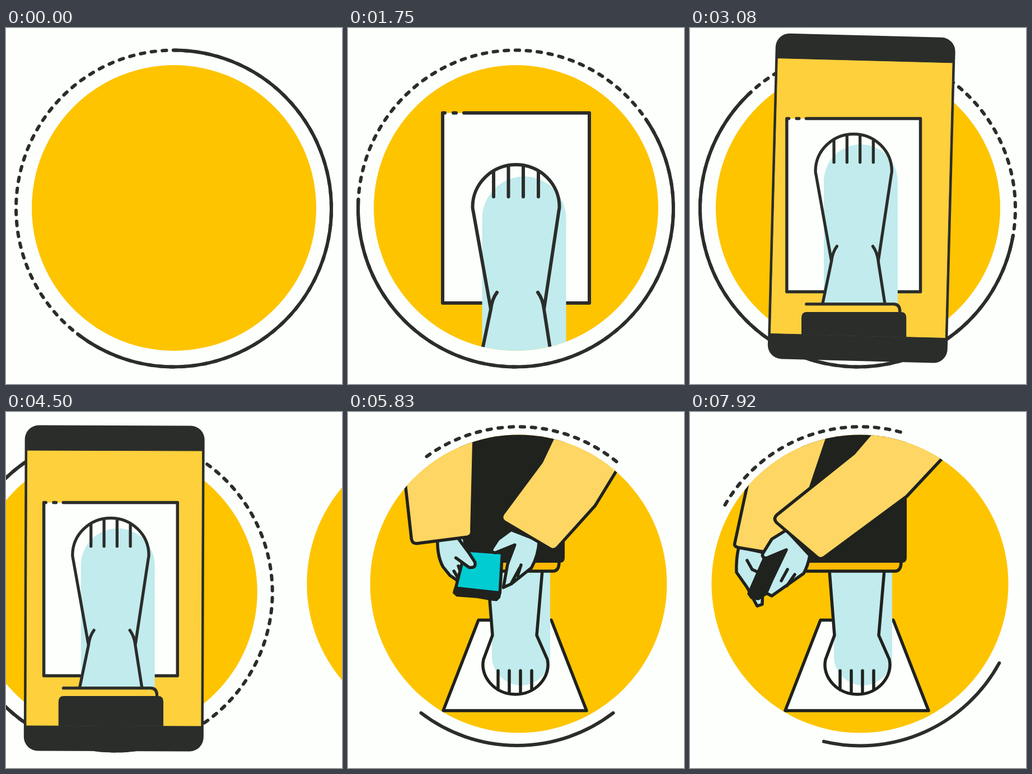
These frames come from a looping animation (600 by 633 pixels, 8000 ms). An HTML page with a canvas:

```html
<!DOCTYPE html>
<html lang="en">
<head>
<meta charset="utf-8">
<title>Foot scan</title>
<style>
  html, body { margin: 0; width: 100%; height: 100%; overflow: hidden; background: #fcfffc; }
  canvas { display: block; }
</style>
</head>
<body>
<canvas id="stage" width="600" height="633"></canvas>
<script>
const ctx = document.getElementById('stage').getContext('2d');
const LOOP = 8000, RAD = Math.PI / 180;
const PAPER = '#fcfffc', YELLOW = '#fec400', SCREEN = '#fdd03c', SLEEVE = '#fdd663';
const INK = '#2b2d2a', BLACK = '#20221e', SKIN = '#c1ebed', CYAN = '#00ccd2';

const clamp = v => Math.max(0, Math.min(1, v));
const progress = (t, start, length) => clamp((t - start) / length);
const easeCubic = p => p < .5 ? 4 * p ** 3 : 1 - 4 * (1 - p) ** 3;
const easeSine = p => (1 - Math.cos(Math.PI * p)) / 2;

function shape(d, fill, stroke, width = 6) {
  const path = new Path2D(d);
  if (fill) { ctx.fillStyle = fill; ctx.fill(path); }
  if (stroke) { ctx.strokeStyle = stroke; ctx.lineWidth = width; ctx.stroke(path); }
}

function disc(x, y, r, fill) {
  ctx.beginPath();
  ctx.arc(x, y, r, 0, 7);
  ctx.fillStyle = fill;
  ctx.fill();
}

// Angles are in degrees, clockwise from the top.
function arc(x, y, r, from, to) {
  ctx.beginPath();
  ctx.arc(x, y, r, (from - 90) * RAD, (to - 90) * RAD);
  ctx.strokeStyle = INK;
  ctx.lineWidth = 6;
  ctx.stroke();
}

function dashes(x, y, r, first, step, count) {
  for (let i = 0; i < count; i++) {
    const middle = first + i * step;
    arc(x, y, r, middle - .75, middle + .75);
  }
}

function group(draw) {
  ctx.save();
  draw();
  ctx.restore();
}

// --- First scene: foot on a sheet, photographed by a phone ---

function sheetAndFoot(t, cuffColor) {
  group(() => {
    ctx.translate(400 * (1 - progress(t, 300, 1350)) ** 2, 0);
    shape('M169 151H431V489H169Z', PAPER);
    shape('M207 151H431V489H169V151h4M188 151h5', null, INK);
  });
  group(() => {
    const rest = (1 - progress(t, 1000, 1238)) ** 2;
    const scale = .965 + .226 * rest;
    ctx.translate(300, 181.7 + 400 * rest);
    ctx.scale(scale, scale);
    ctx.translate(-300, -243.5);
    shape('M239.5 700V339a75 75 0 0 1 150 0V700Z', SKIN);
    shape('M227 634L255 500L223.5 325Q222.5 321 222.5 318A77.5 75 0 0 1 377.5 318Q377.5 321 376.5 325' +
      'L350 500L371 634M255 500Q257 482 266 470M350 500Q348 482 339 470' +
      'M260 256V300M286.5 246V300M313 246V300M340 256V300', null, INK);
    shape('M204 587H381Q394 587 394 606H204Z', cuffColor);
    shape('M204 587H381Q394 587 394 602', null, INK);
    shape('M194 1200V614Q194 603 205 603H396Q407 603 407 614V1200Z', INK);
  });
}

function phone(t) {
  const u = 1 - progress(t, 2250, 1150);
  if (u === 1) return;
  const x = 298.5 + 28 * u, y = 313.5 + 620 * (1.7 * u ** 3 - .7 * u ** 2);
  const tilt = (.2 + 4.7 * u) * RAD;
  group(() => {
    ctx.translate(x, y);
    ctx.rotate(tilt);
    ctx.beginPath();
    ctx.roundRect(-160.5, -289.5, 321, 579, 25);
    ctx.fillStyle = INK;
    ctx.fill();
    group(() => {
      ctx.beginPath();
      ctx.rect(-156.5, -245, 313, 490);
      ctx.fillStyle = SCREEN;
      ctx.fill();
      ctx.clip();
      ctx.rotate(-tilt);
      ctx.translate(292.2 - x, 315 - y);
      ctx.scale(.911, .911);
      ctx.translate(-300, -320);
      sheetAndFoot(t, SCREEN);
    });
    shape('M-156.5 -245h313v490h-313Z', null, INK, 1);
  });
}

function photoScene(t) {
  const s = t / 1000, turn = 31 * s + .45 * s * s;
  dashes(299.5, 321, 281.5, .6, 4, 90);
  arc(299.5, 321, 281.5, turn, turn + 217.5);
  disc(300, 320, 254, YELLOW);
  group(() => {
    ctx.beginPath();
    ctx.arc(300, 320, 254, 0, 7);
    ctx.clip();
    sheetAndFoot(t, YELLOW);
  });
  phone(t);
}

// --- Second scene: hands take the phone away from the leg ---

const poses = {
  leftSleeve: [
    'M67 30L140 220Q144 230 153 227L243 195Q252 191 249 183L207 20',
    'M118 30L84 232Q83 239 90 241L181 252Q190 252 190 240L246 20',
    'M124 30L80 233Q78 239 86 241L140 250Q168 240 188 215L254 20'],
  rightSleeve: [
    'M403 20L382 104L363 181Q360 191 369 195L458 230Q468 233 471 225L488 180L545 30',
    'M356 10L305 73L181 182Q175 190 182 196L255 258Q261 263 268 258L390 152L500 35',
    'M347 10L293 73L155 183Q148 190 155 197L227 258Q232 263 239 259L387 150L497 33'],
  leftPalm: [
    'M198 210Q195 243 206 262L224 282L247 304L257 250L250 195Z',
    'M118 245Q120 272 130 290L136 300L152 304L165 280L160 250Z',
    'M87 240Q82 262 83 285L102 312L120 345L129 342L132 250Z'],
  leftFingers: [
    'M225 272L240 298M240 268L248 290',
    'M150 295L155 302M150 280L152 285',
    'M102 264L111 280M111 280L122 285'],
  leftThumb: [
    'M246 235L280 261Q292 262 289 250L274 226L250 198',
    'M134 286L146 293Q161 296 158 285L152 277L140 256',
    'M125 300L128 302Q130 302 129 300L128 299L126 297'],
  rightHand: [
    'M412 205Q413 240 400 271L380 287L360 304L357 278L366 232L330 244Q322 243 326 235L334 221L367 200Z',
    'M264 255Q260 272 248 284L195 326L187 321L206 262L223 241L190 257Q178 257 184 248L196 232L208 220Z',
    'M214 255Q210 275 203 287L146 327L136 322L147 297L172 245L136 260Q126 258 131 250L146 226L172 210Z'],
  rightFingers: [
    'M382 268L365 298M371 262L363 285',
    'M224 287L212 310M241 283L237 298',
    'M174 280L163 300M187 289L173 309'],
  glass: [
    'M259 242L348 242L360 315L250 315Z',
    'M155 250L196 260L174 329L129 311Z',
    'M150 270L152 270L125 318L123 318Z'],
  edge: [
    'M249 315L248 321L253 326L300 326L347 326L355 326L360 321L360 315Z',
    'M129 313L126 321L131 325L150 330L158 340L166 342L170 338L173 329Z',
    'M130 266L105 323L110 330L122 332L137 322L148 297L170 248L160 252Z']
};

function blend(from, to, p) {
  const target = to.match(/\d+/g);
  let i = 0;
  return from.replace(/\d+/g, n => (+n + (target[i++] - n) * p).toFixed(2) + ' ');
}

function handScene(t) {
  const first = easeSine(progress(t, 5200, 1300));
  const second = easeSine(progress(t, 6600, 960));
  const pose = name => {
    const [a, b, c] = poses[name];
    return second ? blend(b, c, second) : blend(a, b, first);
  };
  const part = (name, fill) => shape(pose(name), fill, BLACK, 5.5);

  group(() => {
    ctx.translate(304, 305.5);
    ctx.rotate(-24 * RAD * easeSine(progress(t, 5880, 1660)));
    dashes(0, 0, 279.3, -35.1, 4.07, 19);
    arc(-2, 4.5, 283, 142.7, 217.3);
  });

  const x = 304.5 - progress(t, 6580, 1340);
  disc(x, 305.5, 265, YELLOW);
  group(() => {
    ctx.beginPath();
    ctx.arc(x, 305.5, 265, 0, 7);
    ctx.clip();
    shape('M233 370H363L426 531H170Z', PAPER, BLACK, 5.5);
    shape('M248 275L257 397V434a52 52 0 0 0 104 0V275Z', SKIN);
    shape('M248 270L258 397L242 440C235 470 262 502 299 502C336 502 363 470 356 440L337 397L348 270' +
      'M268 460V494M288 460V500M308 460V500M328 460V494', null, BLACK, 5.5);
    shape('M207 283H366Q377 283 377 266H207Z', '#feb900');
    shape('M207 283H366Q377 283 377 266', null, BLACK, 5.5);
    shape('M198 0H387V259Q387 268 378 268H207Q198 268 198 259Z', BLACK);
    part('leftPalm', SKIN);
    part('leftFingers');
    part('glass', CYAN);
    part('edge', BLACK);
    part('leftThumb', SKIN);
    part('leftSleeve', SLEEVE);
    part('rightHand', SKIN);
    part('rightFingers');
    part('rightSleeve', SLEEVE);
  });
}

function frame(now) {
  const t = now % LOOP;
  const slide = easeCubic(progress(t, 4207, 835));
  ctx.fillStyle = PAPER;
  ctx.fillRect(0, 0, 600, 633);
  ctx.lineCap = ctx.lineJoin = 'round';
  if (slide < 1) group(() => { ctx.translate(-603 * slide, 0); photoScene(t); });
  if (slide > 0) group(() => { ctx.translate(603 * (1 - slide), 0); handScene(t); });
  requestAnimationFrame(frame);
}
requestAnimationFrame(frame);
</script>
</body>
</html>
```
